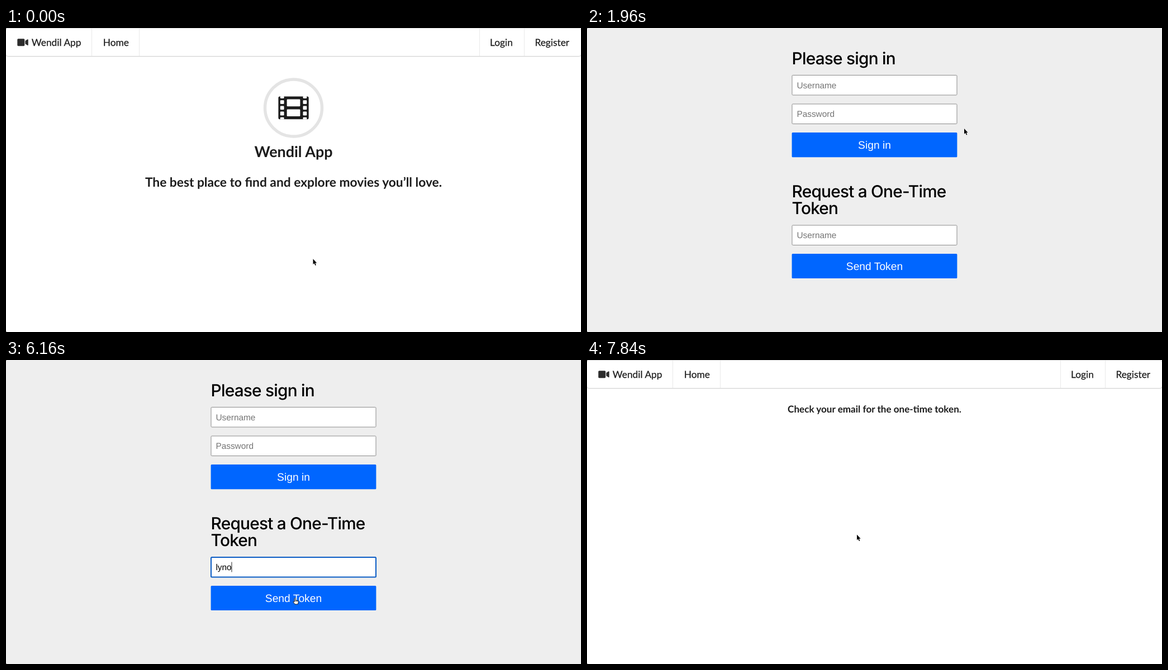
Recreate the animation shown at these times as an HTML page. Size 1029 by 544 pixels, loop 8 s.

```html
<!DOCTYPE html>
<html lang="en">
<head>
<meta charset="utf-8">
<title>One-time token login</title>
<style>
  html, body { margin: 0; width: 100%; height: 100%; overflow: hidden; background: #fff; }
  svg { display: block; width: 100%; height: 100%; text-rendering: geometricPrecision; }
  .site { font: 17.33px Lato, sans-serif; fill: #1c1c1c; }
  .menu { stroke: #1c1c1c; stroke-width: .25; }
  .bold { font-weight: 700; text-anchor: middle; }
  .heading { font: 500 29.8px Inter, sans-serif; font-optical-sizing: none; letter-spacing: -.78px; }
  .field { font: 15.4px "Liberation Sans", Arial, sans-serif; }
  .hint { fill: #757575; }
  .button { font: 19.26px "Liberation Sans", Arial, sans-serif; fill: #fff; text-anchor: middle; }
  .input { fill: #fff; stroke: #8c8c8c; }
  .focused { stroke: #0b5cc4; stroke-width: 2; }
  .divider { stroke: #e9e9e9; }
</style>
</head>
<body>
<svg viewBox="0 0 1029 544" xmlns="http://www.w3.org/2000/svg">
  <g id="site" class="site">
    <rect width="1029" height="544" fill="#fff"/>
    <rect x="-.5" y="1.5" width="1030" height="50" rx="4" fill="none" stroke="#ececec"/>
    <rect x="-.5" y=".5" width="1030" height="50" rx="4" fill="#fff" stroke="#dadada"/>
    <path class="divider" d="M153.5 1V50M238.5 1V50M847.5 1V50M927.5 1V50"/>
    <g transform="translate(20.3 17) scale(.0338)" fill="#2c2c2c">
      <rect y="64" width="384" height="384" rx="48"/>
      <path d="M526 102L416 177V335L526 410Q576 436 576 384V128Q576 76 526 102Z"/>
    </g>
    <g class="menu">
      <text x="45.8" y="31.8">Wendil App</text>
      <text x="173.8" y="31.8">Home</text>
      <text x="866" y="31.8">Login</text>
      <text x="946.4" y="31.8">Register</text>
    </g>

    <g id="home">
      <circle cx="514.5" cy="143" r="51" fill="none" stroke="#e4e4e4" stroke-width="5.4"/>
      <g id="film" transform="translate(487.4 115.7) scale(.106)" fill="#fff">
        <rect y="64" width="512" height="384" rx="24" fill="#1c1c1c"/>
        <rect x="144" y="112" width="224" height="120" rx="12"/>
        <rect x="144" y="280" width="224" height="120" rx="12"/>
      </g>
      <text class="bold" x="514.5" y="230.5" font-size="26.96">Wendil App</text>
      <text class="bold" x="514.5" y="284" font-size="22.75">The best place to find and explore movies you’ll love.</text>
    </g>
    <text id="notice" class="bold" x="514.5" y="93.7" font-size="17.1">Check your email for the one-time token.</text>
  </g>

  <g id="login">
    <rect width="1029" height="544" fill="#eee"/>
    <text class="heading" x="366.6" y="64.7">Please sign in</text>
    <rect class="input" x="367" y="84.5" width="295" height="35.5" rx="1.5"/>
    <text class="field hint" x="375.4" y="107.6">Username</text>
    <rect class="input" x="367" y="136" width="295" height="35.5" rx="1.5"/>
    <text class="field hint" x="375.4" y="159.1">Password</text>
    <rect x="366.6" y="187" width="295.8" height="44.2" rx="1.5" fill="#06f"/>
    <text class="button" x="514.5" y="215.9">Sign in</text>

    <text class="heading" x="366.6" y="302.5">Request a One-Time</text>
    <text class="heading" x="366.6" y="333.3">Token</text>
    <rect id="userBox" x="367" y="353" width="295" height="35.5" rx="1.5"/>
    <text id="user" x="375.4" y="375.9"></text>
    <rect id="caret" y="361.5" width="1" height="18" fill="#222"/>
    <rect x="366.6" y="404" width="295.8" height="44" rx="1.5" fill="#06f"/>
    <text class="button" x="514.5" y="432.6">Send Token</text>
  </g>

  <path d="M0 0H1.5L0 1.5ZM0 542.5V544H1.5Z" fill="#777"/>

  <g id="cursor">
    <circle id="ring" fill="none" stroke="#111" stroke-width="1.3"/>
    <path id="arrow" d="M0 0V9.8L2.2 7.7L3.9 11.6L5.4 11L3.8 7.2H6.7Z" fill="#000" stroke="#fff" stroke-width=".9" paint-order="stroke"/>
    <path id="hand" d="M-1 1Q0-.6 1 1V4.4L5 5.2Q6 5.6 6 7L5 11.5H-.3L-3.3 7.5Q-2.9 5.7-1 7.1ZM1 4.4V6.8M2.9 5V6.8M4.6 5.3V6.8" fill="#fff" stroke="#111" stroke-width=".9" stroke-linejoin="round"/>
    <path id="beam" d="M-2.6-5.7Q0-5.7 0-4.4Q0-5.7 2.6-5.7M0-4.4V4.4M-2.6 5.7Q0 5.7 0 4.4Q0 5.7 2.6 5.7M-1.4 1.8H1.4" fill="none" stroke="#222" stroke-width="1.1"/>
  </g>
</svg>
<script>
const LOOP = 8000, STEP = 70;
const LOGIN_AT = 1680, NOTICE_AT = 6930, FOCUS_AT = 2870, BLUR_AT = 6580;
const USER = 'lyno', TYPE_AT = 3640, KEY_GAP = 140;

// Pointer stops: time, x, y
const route = [
  [0, 549.5, 413.3], [140, 573, 336], [560, 573, 336], [700, 728, 175],
  [840, 728, 175], [1050, 872.5, 36.5], [1750, 872.5, 36.5], [1960, 675, 180],
  [2030, 675, 180], [2170, 570, 270], [2240, 570, 270], [2590, 523, 375.5],
  [5880, 523, 375.5], [6160, 517.3, 425.5], [6370, 510.7, 434.5],
  [7490, 510.7, 434.5], [7840, 483, 312.5], [LOOP, 483, 312.5]
];
const clicks = [[350, 420], [1400, 1540], [2800, 2940], [6510, 6650]];
const caretOff = [[3430, 3640], [4620, 5110], [5670, 6160]];

const $ = id => document.getElementById(id);
const show = (id, on) => $(id).setAttribute('display', on ? 'inline' : 'none');
const within = (t, [from, to]) => t >= from && t < to;

// Perforations along both sides of the film strip
for (const x of [32, 416]) {
  for (let y = 32; y <= 416; y += 96) {
    const top = Math.max(y, 60), bottom = Math.min(y + 64, 452);
    $('film').insertAdjacentHTML('beforeend',
      `<rect x="${x}" y="${top}" width="64" height="${bottom - top}" rx="12"/>`);
  }
}

function pointerAt(t) {
  const i = Math.max(1, route.findIndex(stop => stop[0] >= t));
  const [t0, x0, y0] = route[i - 1], [t1, x1, y1] = route[i];
  const k = (t - t0) / (t1 - t0);
  return [x0 + (x1 - x0) * k, y0 + (y1 - y0) * k];
}

function pointerShape(t, x, y) {
  if (t < LOGIN_AT) return x > 847 && x < 927 && y < 50 && t < 1610 ? 'hand' : 'arrow';
  if (t >= NOTICE_AT || x < 366 || x > 662) return 'arrow';
  if ([[84, 120], [136, 172], [352, 389]].some(box => within(y, box))) return 'beam';
  return [[187, 231], [404, 448]].some(box => within(y, box)) ? 'hand' : 'arrow';
}

function drawForm(t) {
  const focused = within(t, [FOCUS_AT, BLUR_AT]);
  const count = Math.max(0, Math.floor((t - TYPE_AT) / KEY_GAP) + 1);
  const typed = USER.slice(0, count);
  $('userBox').setAttribute('class', focused ? 'input focused' : 'input');
  $('user').textContent = typed || 'Username';
  $('user').setAttribute('class', typed ? 'field' : 'field hint');
  show('caret', focused && !caretOff.some(span => within(t, span)));
  $('caret').setAttribute('x', 375.2 + (typed ? $('user').getComputedTextLength() : 0));
}

function drawPointer(t) {
  const [x, y] = pointerAt(t), shape = pointerShape(t, x, y);
  const click = clicks.find(span => within(t, span));
  show('cursor', !within(t, [TYPE_AT, 5950]));
  $('cursor').setAttribute('transform', `translate(${x} ${y})`);
  for (const id of ['arrow', 'hand', 'beam']) show(id, id === shape);
  show('ring', click);
  if (click) $('ring').setAttribute('r', t === click[0] ? 15 : 12);
}

function draw(now) {
  const t = Math.floor((now % LOOP + .5) / STEP) * STEP;
  const onLogin = within(t, [LOGIN_AT, NOTICE_AT]);
  show('site', !onLogin);
  show('login', onLogin);
  show('home', t < LOGIN_AT);
  show('notice', t >= NOTICE_AT);
  if (onLogin) drawForm(t);
  drawPointer(t);
}

const start = performance.now();
function tick() {
  draw(performance.now() - start);
  requestAnimationFrame(tick);
}
tick();
</script>
</body>
</html>
```
